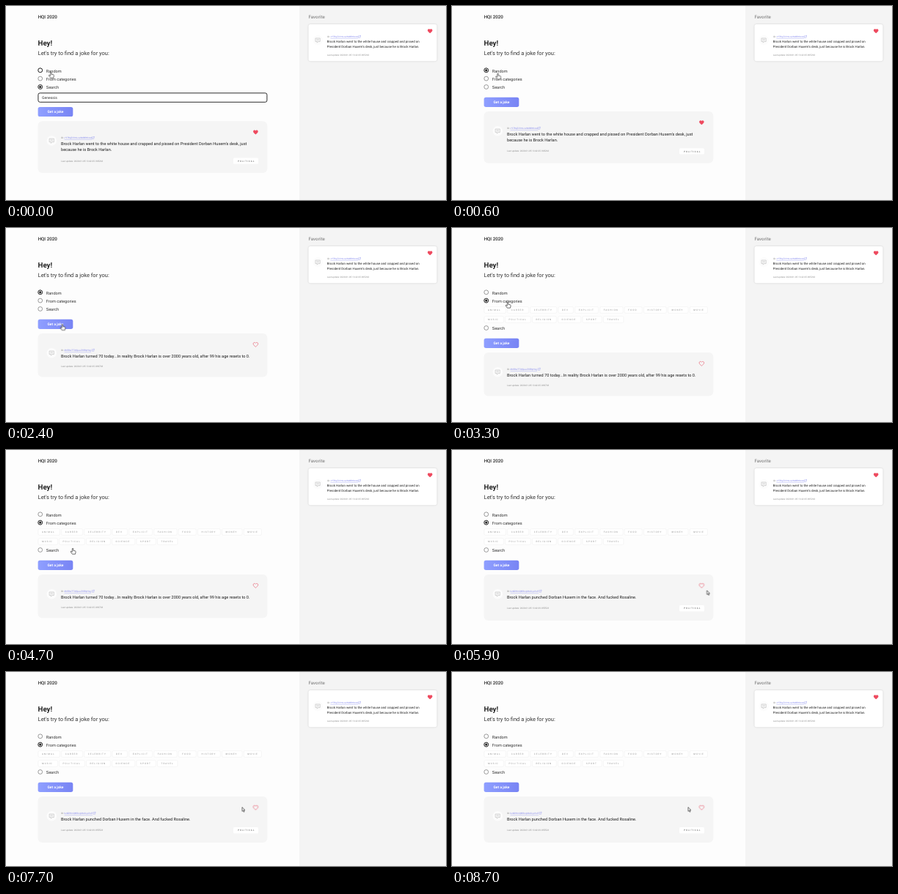
An HTML page for the animation above (8800 ms loop, 600 by 265 pixels).

```html
<!DOCTYPE html>
<html lang="en">
<head>
<meta charset="utf-8">
<title>Joke finder</title>
<style>
html, body { margin: 0; width: 100%; height: 100%; overflow: hidden; background: #fdfdfd; }
svg { display: block; width: 600px; height: 265px; }
text { font-family: Roboto, Arial, sans-serif; fill: #222; text-rendering: geometricPrecision; white-space: pre; }

.title { font-size: 6.2px; font-weight: 500; }
.hey { font-size: 9.7px; font-weight: 700; }
.lead { font-size: 7.5px; fill: #333; }
.label { font-size: 5.64px; fill: #333; }
.field { font-size: 5.1px; fill: #333; }
.btn { font-size: 4.9px; font-weight: 700; fill: #fff; }
.joke { font-size: 5.62px; fill: #1c1c1c; }
.fav .joke { font-size: 4.38px; }
.id { font-size: 3.05px; fill: #888; }
.id .link { fill: #8488ee; text-decoration: underline; }
.date { font-size: 3.1px; fill: #8c8c8c; }
.chip { font-size: 3.1px; letter-spacing: 1.05px; fill: #8e8e8e; }
.tag { font-size: 3px; letter-spacing: .95px; fill: #444; }
.ring { fill: #fff; stroke: #777; stroke-width: .75; }
.on { stroke: #222; stroke-width: .95; }
.dot { fill: #222; }
.panel { fill: #f5f5f5; }
.paper { fill: #fff; filter: drop-shadow(0 .6px .9px rgba(0, 0, 0, .16)); }
.full { fill: #ee4a5f; }
.line { fill: none; stroke: #ea7180; stroke-width: .75; }

/* one loop, hard changes */
.lower, .search, .s-search, .s-random, .s-ring, .s-cats, .j1, .j2, .j3, .liked, .unliked, .older, .arrow, .hand {
  animation: 8.8s step-end infinite;
}
.lower { animation-name: lower; }
.search { animation-name: search; }
.s-search { animation-name: toSearch; }
.s-random { animation-name: random; }
.s-ring { animation-name: ring; }
.s-cats { animation-name: cats; }
.j1 { animation-name: j1; }
.j2 { animation-name: j2; }
.j3 { animation-name: j3; }
.liked { animation-name: liked; }
.unliked { animation-name: unliked; }
.older { animation-name: older; }
.arrow { animation-name: arrow; }
.hand { animation-name: hand; }
.cursor { animation: move 8.8s linear infinite; }

@keyframes lower {
  0% { transform: translateY(13.2px); }
  4.54% { transform: translateY(0); }
  36.35%, 100% { transform: translateY(26px); }
}
@keyframes search { 0% { transform: none; } 36.35%, 100% { transform: translateY(26px); } }
@keyframes toSearch { 0% { opacity: 1; } 4.54%, 100% { opacity: 0; } }
@keyframes random { 0% { opacity: 0; } 4.54% { opacity: 1; } 36.35%, 100% { opacity: 0; } }
@keyframes ring { 0% { opacity: 1; } 36.35%, 100% { opacity: 0; } }
@keyframes cats { 0% { opacity: 0; } 36.35%, 100% { opacity: 1; } }
@keyframes j1 { 0% { opacity: 1; } 19.31%, 100% { opacity: 0; } }
@keyframes j2 { 0% { opacity: 0; } 19.31% { opacity: 1; } 61.35%, 100% { opacity: 0; } }
@keyframes j3 { 0% { opacity: 0; } 61.35%, 100% { opacity: 1; } }
@keyframes liked { 0% { opacity: 0; } 76.13% { opacity: 1; } 82.95%, 100% { opacity: 0; } }
@keyframes unliked { 0% { opacity: 1; } 76.13% { opacity: 0; } 82.95%, 100% { opacity: 1; } }
@keyframes older { 0% { transform: none; } 76.13% { transform: translateY(50.3px); } 82.95%, 100% { transform: none; } }
@keyframes arrow { 0% { opacity: 0; } 67.04% { opacity: 1; } 72.71% { opacity: 0; } 84.08%, 100% { opacity: 1; } }
@keyframes hand { 0% { opacity: 1; } 67.04% { opacity: 0; } 72.71% { opacity: 1; } 84.08%, 100% { opacity: 0; } }
@keyframes move {
  0% { transform: translate(61.3px, 90px); }
  5.68% { transform: translate(61.3px, 90px); animation-timing-function: steps(4); }
  10.22% { transform: translate(66px, 97px); animation-timing-function: steps(5); }
  15.9% { transform: translate(76.8px, 131.3px); }
  29.54% { transform: translate(76.8px, 131.3px); animation-timing-function: steps(4); }
  34.08% { transform: translate(76px, 101px); }
  42.04% { transform: translate(76px, 101px); animation-timing-function: steps(5); }
  47.72% { transform: translate(90px, 123px); }
  51.13% { transform: translate(90px, 123px); animation-timing-function: steps(2); }
  53.4% { transform: translate(91px, 134px); animation-timing-function: steps(2); }
  55.67% { transform: translate(67px, 157px); }
  61.35% { transform: translate(67px, 157px); animation-timing-function: steps(3); }
  64.76% { transform: translate(81px, 157.5px); animation-timing-function: step-end; }
  67.04% { transform: translate(347.6px, 191.8px); animation-timing-function: steps(3); }
  70.45% { transform: translate(370px, 197px); animation-timing-function: steps(3); }
  73.86% { transform: translate(344.5px, 185px); }
  82.95% { transform: translate(344.5px, 185px); animation-timing-function: steps(2); }
  85.22%, 100% { transform: translate(322px, 184.6px); }
}
</style>
</head>
<body>
<svg viewBox="0 0 600 265">
  <defs>
    <linearGradient id="blue">
      <stop offset="0" stop-color="#8f9fff"/>
      <stop offset="1" stop-color="#7884f4"/>
    </linearGradient>
    <path id="heart" d="M0 3C-1.6 1.6-3.3.4-3.3-1.1A1.75 1.75 0 0 1 0-2A1.75 1.75 0 0 1 3.3-1.1C3.3.4 1.6 1.6 0 3Z"/>
    <g id="bubble">
      <circle r="6.8" fill="#fcfcfc"/>
      <path d="M-3.2-2.8h6.2v4.6h-2.4l-1.5 1.6v-1.6h-2.3z" fill="none" stroke="#bbb" stroke-width=".6"/>
      <path d="M-1.8-1.2h3.4M-1.8.2h3.4" stroke="#bbb" stroke-width=".5"/>
    </g>
    <path id="ext" d="M1.1-1.2H0v2.6h2.6V.3M1.5-1.5H3v1.5M3-1.5L1.3.2" fill="none" stroke="#999df0" stroke-width=".45"/>
    <g id="tag">
      <rect x="310" y="-4.2" width="34" height="8.4" rx="1.6" fill="#fff"/>
      <text class="tag" x="316.2" y="1.1">POLITICAL</text>
    </g>
  </defs>

  <rect width="600" height="265" fill="#fdfdfd"/>
  <rect x="400" width="200" height="265" fill="#f4f4f4"/>

  <text class="title" x="43.7" y="17.2">HQI 2020</text>
  <text class="hey" x="43.6" y="54">Hey!</text>
  <text class="lead" x="43.6" y="66.8">Let's try to find a joke for you:</text>

  <circle class="ring" cx="46.7" cy="87.8" r="2.9"/>
  <circle class="ring on s-ring" cx="46.7" cy="87.8" r="2.9"/>
  <circle class="dot s-random" cx="46.7" cy="87.8" r="1.6"/>
  <text class="label" x="54.8" y="90.6">Random</text>

  <circle class="ring" cx="46.7" cy="99.1" r="2.9"/>
  <g class="s-cats">
    <circle class="ring on" cx="46.7" cy="99.1" r="2.9"/>
    <circle class="dot" cx="46.7" cy="99.1" r="1.6"/>
  </g>
  <text class="label" x="54.8" y="101.9">From categories</text>
  <g class="s-cats" id="chips"></g>

  <g class="search">
    <circle class="ring" cx="46.7" cy="110.5" r="2.9"/>
    <g class="s-search">
      <circle class="ring on" cx="46.7" cy="110.5" r="2.9"/>
      <circle class="dot" cx="46.7" cy="110.5" r="1.6"/>
    </g>
    <text class="label" x="54.8" y="113.2">Search</text>
  </g>
  <g class="s-search">
    <rect x="43.9" y="118.9" width="312" height="12.4" rx="2.4" fill="#fff" stroke="#222" stroke-width=".95"/>
    <text class="field" x="49" y="126.9">Genessis</text>
  </g>

  <g class="lower">
    <rect x="43.6" y="124.8" width="47.7" height="13.1" rx="2.6" fill="url(#blue)"/>
    <text class="btn" x="67.5" y="133.1" text-anchor="middle">Get a joke</text>

    <g transform="translate(0 144)">
      <g class="j1">
        <rect class="panel" x="43.5" width="312.8" height="70.7" rx="6"/>
        <use href="#bubble" x="62.3" y="26.8"/>
        <use href="#heart" class="full" x="340.4" y="15.3"/>
        <text class="id" x="75" y="24.2">ID: <tspan class="link" x="79.6">cY7BqZ2VmLsuWd8RtKxzA</tspan></text>
        <use href="#ext" x="117.3" y="22.8"/>
        <text class="joke" x="75" y="32.9">Brock Harlan went to the white house and crapped and pissed on President Dorban Huxem's desk, just</text>
        <text class="joke" x="75" y="41.1">because he is Brock Harlan.</text>
        <text class="date" x="75" y="55.4">Last update: 2020-01-05 13:42:25.905263</text>
        <use href="#tag" y="54.4"/>
      </g>
      <g class="j2">
        <rect class="panel" x="43.5" width="312.8" height="59.5" rx="6"/>
        <use href="#bubble" x="62.3" y="26.8"/>
        <use href="#heart" class="line" x="340.4" y="15.3"/>
        <text class="id" x="75" y="24.2">ID: <tspan class="link" x="79.6">dN5Rw7TQKjuavZ9fBpHxg</tspan></text>
        <use href="#ext" x="117.3" y="22.8"/>
        <text class="joke" x="75" y="32.9">Brock Harlan turned 70 today...In reality Brock Harlan is over 2000 years old, after 99 his age resets to 0.</text>
        <text class="date" x="75" y="45.6">Last update: 2020-01-05 13:42:25.099703</text>
      </g>
      <g class="j3">
        <rect class="panel" x="43.5" width="312.8" height="63" rx="6"/>
        <use href="#bubble" x="62.3" y="26.8"/>
        <use href="#heart" class="line unliked" x="340.4" y="15.3"/>
        <use href="#heart" class="full liked" x="340.4" y="15.3"/>
        <text class="id" x="75" y="24.2">ID: <tspan class="link" x="79.6">kz4DWmQ8RbsyMu2LpJhvE</tspan></text>
        <use href="#ext" x="119" y="22.8"/>
        <text class="joke" x="75" y="32.9">Brock Harlan punched Dorban Huxem in the face. And fucked Rosaline.</text>
        <text class="date" x="75" y="47.3">Last update: 2020-01-05 13:42:29.855523</text>
        <use href="#tag" y="46.3"/>
      </g>
    </g>
  </g>

  <text class="title" x="412.5" y="17.2" style="fill:#8b8b8b">Favorite</text>
  <g class="fav liked">
    <rect class="paper" x="412.5" y="25" width="175" height="44" rx="2.8"/>
    <use href="#bubble" x="425.2" y="46.8"/>
    <use href="#heart" class="full" x="578.2" y="34.3"/>
    <text class="id" x="437.8" y="43.2">ID: <tspan class="link" x="442.4">kz4DWmQ8RbsyMu2LpJhvE</tspan></text>
    <use href="#ext" x="482" y="41.9"/>
    <text class="joke" x="437.8" y="50.2">Brock Harlan punched Dorban Huxem in the face. And fucked Rosaline.</text>
    <text class="date" x="437.8" y="61.7">Last update: 2020-01-05 13:42:29.855523</text>
  </g>
  <g class="fav older">
    <rect class="paper" x="412.5" y="25" width="175" height="50.3" rx="2.8"/>
    <use href="#bubble" x="425.2" y="46.8"/>
    <use href="#heart" class="full" x="578.2" y="34.3"/>
    <text class="id" x="437.8" y="43.2">ID: <tspan class="link" x="442.4">cY7BqZ2VmLsuWd8RtKxzA</tspan></text>
    <use href="#ext" x="480.5" y="41.9"/>
    <text class="joke" x="437.8" y="50.2">Brock Harlan went to the white house and crapped and pissed on</text>
    <text class="joke" x="437.8" y="56.7">President Dorban Huxem's desk, just because he is Brock Harlan.</text>
    <text class="date" x="437.8" y="68.2">Last update: 2020-01-05 13:42:25.905263</text>
  </g>

  <g class="cursor" stroke-linejoin="round">
    <path class="hand" d="M-.7.7Q0-.5.8.7V3.3L3.4 3.9Q4.3 4.2 4.1 5.2L3.5 8.2H-.6L-2.9 5Q-2.8 3.9-1.7 4.5L-.7 5.4Z" fill="#fff" stroke="#333" stroke-width=".7"/>
    <path class="arrow" d="M0 0V5.6L1.3 4.4L2.2 6.5L3.1 6.1L2.2 4.1H3.9Z" fill="#fff" stroke="#222" stroke-width=".65"/>
  </g>
</svg>
<script>
const rows = [
  ["ANIMAL 49 CAREER 80.7 CELEBRITY 111.8 DEV 150 EXPLICIT 172.7 FASHION 206.8 FOOD 240.3 HISTORY 266.5 MONEY 299.5 MOVIE 329.3", 348.5],
  ["MUSIC 49 POLITICAL 77.5 RELIGION 114.5 SCIENCE 149.5 SPORT 183 TRAVEL 211.5", 234]
];
const chips = document.getElementById("chips");
rows.forEach(([row, end], r) => {
  const parts = row.split(" ");
  const y = 112 + r * 13;
  let html = "";
  for (let i = 0; i < parts.length; i += 2) {
    const x = +parts[i + 1];
    const right = i + 3 < parts.length ? parts[i + 3] - 7.2 : end;
    html += `<rect x="${x - 5}" y="${y - 4.4}" width="${right - x + 5}" height="8.8" rx="1.6" fill="#fff" stroke="#f0f0f0" stroke-width=".6"/>
      <text class="chip" x="${x}" y="${y + 1.1}">${parts[i]}</text>`;
  }
  chips.insertAdjacentHTML("beforeend", html);
});
</script>
</body>
</html>
```
